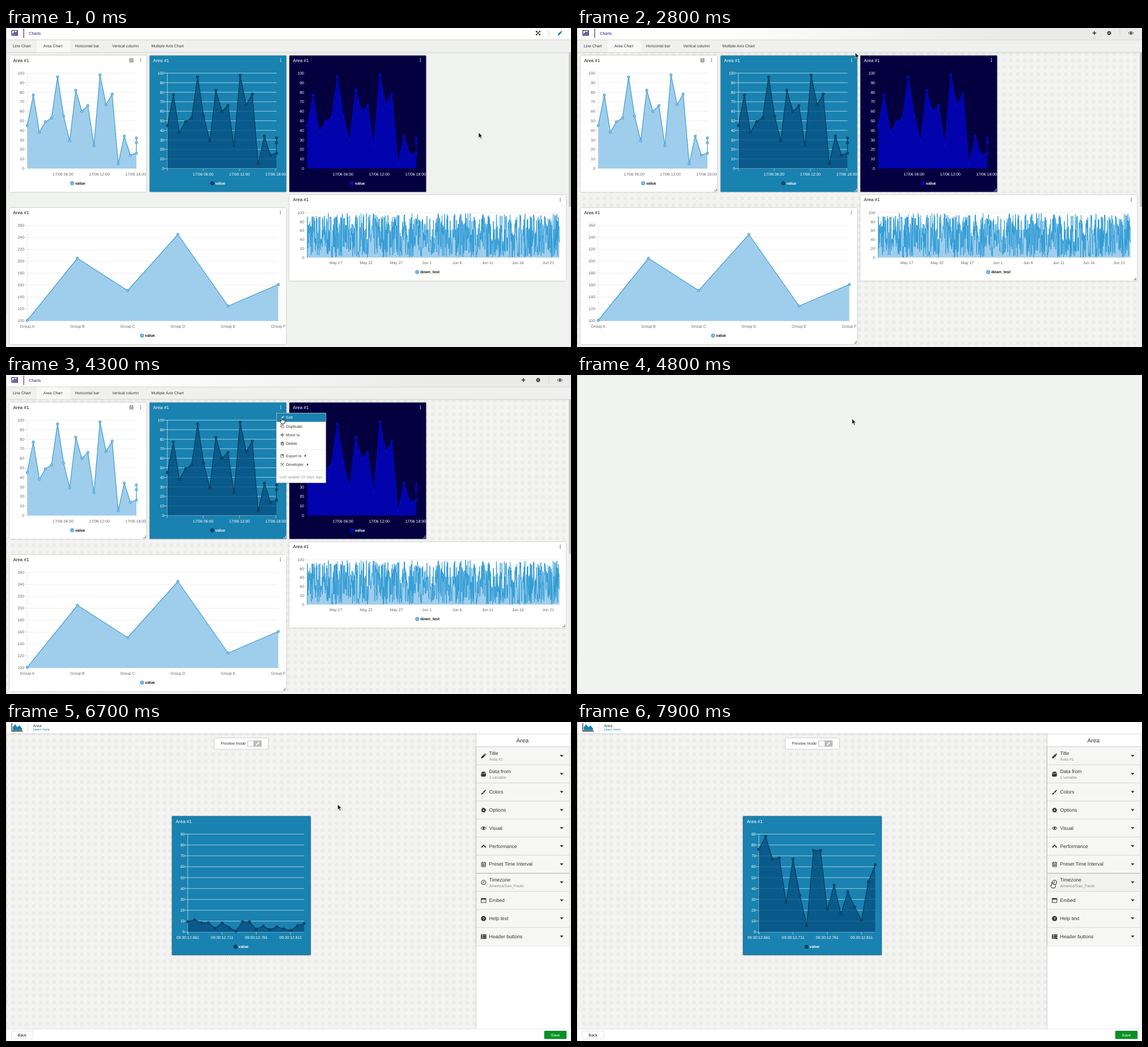
Recreate the animation shown at these times as an HTML page. Size 997 by 562 pixels, loop 8000 ms.

```html
<!DOCTYPE html>
<html lang="en">
<head>
<meta charset="utf-8">
<title>Charts dashboard</title>
<style>
html, body { margin: 0; width: 100%; height: 100%; overflow: hidden; background: #f0f2ef; }
svg { display: block; width: 100%; height: 100%; }
text { font: 6.9px "Liberation Sans", Arial, sans-serif; text-rendering: geometricPrecision; white-space: pre; }
.sh { filter: drop-shadow(0 .6px 1.2px rgba(0,0,0,.3)); }
</style>
</head>
<body>
<svg id="stage" viewBox="0 0 997 562" xmlns="http://www.w3.org/2000/svg"></svg>
<script>
const BLUE = '#1982b0', INK = '#333';

// ---- drawing helpers, all returning markup ----
const rect = (x, y, w, h, fill, extra = '') =>
  `<rect x="${x}" y="${y}" width="${w}" height="${h}" fill="${fill}" ${extra}/>`;
const line = (x1, y1, x2, y2, c, w = .7) =>
  `<path d="M${x1} ${y1}L${x2} ${y2}" stroke="${c}" stroke-width="${w}"/>`;
const dot = (x, y, r, fill, extra = '') => `<circle cx="${x}" cy="${y}" r="${r}" fill="${fill}" ${extra}/>`;
// y is the vertical middle of the capitals
const text = (s, x, y, { size = 6.9, fill = INK, anchor = 'start', bold = false } = {}) =>
  `<text x="${x}" y="${y + size * .355}" fill="${fill}" text-anchor="${anchor}" style="font-size:${size}px${bold ? ';font-weight:700' : ''}">${s}</text>`;
const group = (s, attr = '') => `<g ${attr}>${s}</g>`;
const dots3 = (x, y, c) => [-2.4, 0, 2.4].map(d => dot(x, y + d, .8, c)).join('');
const caret = (x, y, c = INK) => `<path d="M${x - 3.3} ${y - 1.6}h6.6l-3.3 3.5z" fill="${c}"/>`;

// icons live in a 10 x 10 box around the origin
const stroke = (d, w = 1) => `<path d="${d}" fill="none" stroke="currentColor" stroke-width="${w}"/>`;
const solid = d => `<path d="${d}" fill="currentColor" fill-rule="evenodd"/>`;
const icons = {
  pencil: solid('M-5 5L-4.3 2 1.4-3.7 3.8-1.3-2 4.4zM2-4.3L3-5.2 5.2-3 4.3-2z'),
  bars: stroke('M-5-4.2H5V4.2H-5z', 1.2) + solid('M-3.4 3V0h1.5v3zM-1.2 3V-2.7H.3V3zM1-1.4H2.4V3H1zM3-2.4H4.1V3H3z'),
  expand: stroke('M-3.6-3.6L3.6 3.6M3.6-3.6L-3.6 3.6', 1.3) + solid('M-4.6-4.6h3.4l-3.4 3.4zM4.6-4.6v3.4L1.2-4.6zM-4.6 4.6V1.2L-1.2 4.6zM4.6 4.6H1.2L4.6 1.2z'),
  plus: stroke('M-4 0H4M0-4V4', 2),
  gear: `<circle r="2.6" fill="none" stroke="currentColor" stroke-width="2.4"/><circle r="4" fill="none" stroke="currentColor" stroke-width="1.8" stroke-dasharray="1.57 1.57"/>`,
  eye: stroke('M-5.2 0Q0-6 5.2 0Q0 6-5.2 0z', 1.1) + '<circle r="2" fill="currentColor"/>',
  calendar: stroke('M-4.2-3.5H4.2V4.6H-4.2zM-4.2-1H4.2M-4.2 1.8H4.2M-1.4-1V4.6M1.4-1V4.6', .9) + stroke('M-2.3-5V-2.5M2.3-5V-2.5', 1.3),
  copy: stroke('M-2-2H4.5V4.5H-2zM-2 2H-4.5V-4.5H2V-2', 1),
  move: stroke('M-4 0H4M0-4V4', 1.2) + solid('M0-5.5L2-3H-2zM0 5.5L2 3H-2zM-5.5 0L-3 2V-2zM5.5 0L3 2V-2z'),
  trash: stroke('M-3.4-2.5H3.4V4.5H-3.4zM-5-2.8H5M-1.5-3V-4.6H1.5V-3M-1.2-1V3M1.2-1V3', 1.1),
  share: stroke('M0-3H-4.5V4.5H3.5V1', 1.1) + solid('M1-5L5.5-2 1 1V-1Q-1-1-2 1Q-2-3 1-3z'),
  tools: stroke('M-4.3-4.3L4.3 4.3M4.3-4.3L-4.3 4.3', 1.4) + stroke('M-5-2L-2-5M2-5L5-2', 1.2),
  data: solid('M-5-2.5L-1-5 4-4 2-1.2H-5zM-5-.5H2.5L4.6-3V3.5Q4 5 2.5 5H-3.5Q-5 5-5 3.5z'),
  brush: solid('M5-5Q2-4-1.2 0L.6 1.8Q4-1.6 5-5zM-1.8.8Q-4 1-4 3L-5.4 4.6Q-1 5.5-.2 2.4z'),
  up: stroke('M-4.3 2.4L0-2L4.3 2.4', 2.1),
  clock: '<circle r="4.3" fill="none" stroke="currentColor" stroke-width="1.2"/>' + stroke('M0-2.5V.5H-2', 1),
  frame: stroke('M-4.6-3.8H4.6V4H-4.6z', 1.1) + solid('M-5-4.3H5V-1.8H-5z'),
  help: '<circle r="5" fill="currentColor"/><text y="2.8" text-anchor="middle" fill="#fff" style="font-size:7.5px;font-weight:700">?</text>',
  list: solid('M-5.3-4.2h3v2.4h-3zM-5.3-1.2h3v2.4h-3zM-5.3 1.8h3v2.4h-3zM-1.5-4.2h7v2.4h-7zM-1.5-1.2h7v2.4h-7zM-1.5 1.8h7v2.4h-7z'),
};
const icon = (name, x, y, c = INK, k = .8) =>
  `<g transform="translate(${x} ${y}) scale(${k})" color="${c}">${icons[name]}</g>`;

// ---- charts ----
const light = { fill: '#9fcdec', line: '#45a1d1', dot: '#86bde4', grid: '#e6e6e6', label: '#666', text: '#111' };
const teal = { fill: '#065083', alpha: .8, line: '#083c5e', dot: '#0a4a74', grid: '#dcebf2', label: '#fff', text: '#fff' };
const navy = { fill: '#0204c0', alpha: .85, line: '#0307b8', dot: '#0409bd', grid: '#00001c', label: '#fff', text: '#fff' };

const series = (pts, base, st, r = 2.3) => {
  const d = pts.map(p => p.map(n => n.toFixed(2)).join(' ')).join('L');
  return `<path d="M${pts[0][0]} ${base}L${d}L${pts[pts.length - 1][0]} ${base}z" fill="${st.fill}" fill-opacity="${st.alpha || 1}"/>` +
    `<path d="M${d}" fill="none" stroke="${st.line}" stroke-width="${r ? 1.3 : 1}" stroke-linejoin="round"/>` +
    (r ? pts.map(p => dot(p[0], p[1], r, st.dot, `stroke="${st.line}" stroke-width=".8"`)).join('') : '');
};
// lo..hi every step; top and base are the y of hi and lo
const axes = (c, st) => {
  let s = line(c.x0, c.top, c.x0, c.base + 4, st.grid);
  for (let v = c.lo; v <= c.hi; v += c.step) {
    const y = c.base - (v - c.lo) / (c.hi - c.lo) * (c.base - c.top);
    s += line(c.x0 - 5.5, y, c.x1, y, st.grid) + text(v, c.x0 - 5.5, y, { fill: st.label, anchor: 'end' });
  }
  c.labels.forEach((l, i) => {
    const x = c.lx + i * c.dx;
    s += line(x, c.base, x, c.base + 4.5, st.grid) + text(l, x, c.base + 9.6, { fill: st.label, anchor: 'middle' });
  });
  return s;
};
const legend = (x, y, st, name = 'value') =>
  dot(x, y, 2.8, st.dot, `stroke="${st.line}" stroke-width="1.2"`) + text(name, x + 5.3, y, { fill: st.text, bold: true });

const card = (x, y, w, h, fill, ink, menuInk) =>
  rect(x, y, w, h, fill, 'rx="1" class="sh"') + text('Area #1', x + 6.2, y + 8.2, { size: 8, fill: ink }) +
  dots3(x + w - 10, y + 8.2, menuInk);

const daily = [45, 77, 38, 49, 53, 96, 55, 29, 82, 60, 66, 24, 98, 67, 78, 5, 34, 14, 16, 27, 32];
function dailyCard(x, fill, st) {
  const c = { lo: 0, hi: 100, step: 10, top: 79.5, base: 247.5, x0: x + 31.3, x1: x + 224, lx: x + 94.6, dx: 64,
    labels: ['17/06 06:00', '17/06 12:00', '17/06 18:00'] };
  const pts = daily.map((v, i) => [c.x0 + Math.min(i, 18) * 10.7, c.base - v * 1.68]);
  return card(x, 48.5, 241.3, 240.3, fill, st.text, st === light ? '#555' : '#fff') +
    axes(c, st) + series(pts, c.base, st) + legend(x + 110.5, 273.5, st);
}
function groupCard() {
  const c = { lo: 100, hi: 260, step: 20, top: 348, base: 516, x0: 37.5, x1: 480.5, lx: 37.5, dx: 88.6,
    labels: [...'ABCDEF'].map(l => 'Group ' + l) };
  const pts = [101, 205, 151, 245, 125, 161].map((v, i) => [37.5 + i * 88.6, 516 - (v - 100) * 1.05]);
  return card(6.2, 317, 488, 240, '#fff', '#111', '#555') + axes(c, light) + series(pts, 516, light) + legend(240, 542, light);
}
function noiseCard() {
  const c = { lo: 0, hi: 100, step: 20, top: 325.3, base: 404.3, x0: 531.5, x1: 977, lx: 582, dx: 53.55,
    labels: ['May 17', 'May 22', 'May 27', 'Jun 1', 'Jun 6', 'Jun 11', 'Jun 16', 'Jun 21'] };
  let seed = 7;
  const rnd = () => (seed = seed * 16807 % 2147483647) / 2147483647;
  const count = 1050;
  const pts = Array.from({ length: count }, (_, i) => [531.5 + i * 445 / (count - 1), 404.3 - rnd() * 78]);
  return card(500, 294.3, 488, 151, '#fff', '#111', '#555') + axes(c, light) +
    series(pts, 404.3, { ...light, line: '#2f9bd5' }, 0) + legend(725.6, 430, light, 'down_test');
}

// ---- dashboard ----
function dashboard() {
  const tabs = [['Line Chart', 12], ['Area Chart', 66], ['Horizontal bar', 121.7], ['Vertical column', 187.3], ['Multiple Axis Chart', 256.6]];
  const corner = (x, y, c) => `<path d="M${x - 4} ${y}h4v-4" fill="none" stroke="${c}" stroke-width="1.1"/>`;
  return rect(0, 0, 997, 562, '#f0f2ef') +
    group(rect(0, 43, 993, 519, '#f3f3f1') + rect(0, 43, 993, 519, 'url(#tiles)'), 'id="tilesOn"') +
    dailyCard(6.2, '#fff', light) + icon('calendar', 221.3, 56.8, '#666', .75) +
    dailyCard(253.4, BLUE, teal) + dailyCard(500, '#040040', navy) + groupCard() + noiseCard() +
    group(corner(246, 287, '#777') + corner(493.3, 287, '#dde') + corner(739.5, 287, '#aab') +
      corner(986, 443.5, '#777') + corner(492.5, 555.3, '#777'), 'id="corners"') +
    rect(0, 20, 997, 22.6, '#f0f1ef', 'class="sh"') + rect(54, 21, 59, 21.6, '#f8f9f7') +
    tabs.map(([s, x]) => text(s, x, 31.7)).join('') +
    rect(0, 0, 997, 20.3, '#fefefe', 'class="sh"') + group(rect(0, 0, 997, 20.3, 'url(#bar)'), 'id="barOn"') +
    icon('bars', 15.3, 8.7, '#20106f', 1) + line(31.3, 1, 31.3, 17.5, '#20106f', 1) +
    text('Charts', 40.3, 9.2, { size: 7.1, fill: '#21108a' }) + line(958, 2, 958, 16, '#ccc') +
    group(rect(966, 2.5, 23.5, 13.5, '#e3e6e4', 'rx="1"'), 'id="hover"') +
    group(icon('expand', 939, 8.9, '#222', .85) + icon('pencil', 977.5, 9, BLUE, .8), 'id="viewTools"') +
    group(icon('plus', 913, 8.7, INK, .8) + icon('gear', 939, 8.9, INK, .78) + icon('eye', 977.5, 8.9, INK, .85), 'id="editTools"') +
    rect(993, 43, 4, 519, '#ededec') + rect(993.3, 43, 3.7, 272, '#c3c4c3') +
    group(rect(947, 20, 43, 18.7, BLUE, 'rx="1" class="sh"') + text('Edit mode', 968.3, 29.5, { fill: '#fff', anchor: 'middle' }), 'id="tip"') +
    group(menu(), 'id="menu"');
}
function menu() {
  const rows = [['Edit', 'pencil', 75], ['Duplicate', 'copy', 90.2], ['Move to', 'move', 105.6], ['Delete', 'trash', 120.7],
    ['Export to', 'share', 142.2], ['Developer', 'tools', 157.8]];
  const arrow = (x, y) => `<path d="M${x} ${y - 2.3}l2.6 2.3-2.6 2.3z" fill="${INK}"/>`;
  const row = ([s, i, y], c) => icon(i, 487.5, y, c, .62) + text(s, 494, y, { fill: c });
  return rect(477, 67, 87.5, 123, '#fff', 'class="sh" stroke="#aaa" stroke-width=".6"') +
    rows.map(r => row(r, INK)).join('') + arrow(527, 142.2) + arrow(531, 157.8) +
    line(477, 131.3, 564.5, 131.3, '#ddd') + line(477, 168.3, 564.5, 168.3, '#ddd') +
    text('Last update 15 days ago', 482.6, 179.2, { fill: '#999' }) +
    group(rect(477.5, 67.5, 86.5, 15, BLUE) + row(rows[0], '#fff'), 'id="editRow"');
}

// ---- widget editor ----
function editor() {
  const rows = [['Title', 'pencil', 'Area #1'], ['Data from', 'data', '1 variable'], ['Colors', 'brush'], ['Options', 'gear'],
    ['Visual', 'eye'], ['Performance', 'up'], ['Preset Time Interval', 'calendar'], ['Timezone', 'clock', 'America/Sao_Paulo'],
    ['Embed', 'frame'], ['Help text', 'help'], ['Header buttons', 'list']];
  const side = rows.map(([s, i, sub], n) => {
    const y = 43.7 + n * 31.83, m = y + 15.8;
    return rect(830, y, 164, 31.83, '#f6f6f4', n === 7 ? 'id="zone"' : '') + line(830, y, 994, y, n === 7 ? '#aaa' : '#cfcfcf', n === 7 ? 1.2 : .8) +
      icon(i, 842.7, m + .3, INK, .9) + text(s, 852.6, sub ? m - 4.6 : m - .2, { size: 8.6 }) +
      (sub ? text(sub, 852.6, m + 5.8, { fill: '#888' }) : '') + caret(980.5, m);
  }).join('');
  return rect(0, 0, 997, 562, '#f3f3f1') + rect(0, 20, 830, 522, 'url(#tiles)') +
    rect(368.3, 28.5, 94, 19, '#fff', 'class="sh"') + text('Preview mode', 379.2, 38) +
    rect(426, 32.5, 25.2, 11, '#bdbdbd', 'rx="1"') + rect(427, 33.5, 9.8, 9, '#fff', 'rx="1"') + icon('pencil', 444, 38, '#fff', .65) +
    rect(829.5, 20, 164.5, 522, '#fff') + line(829.5, 20, 829.5, 541, '#ccc', .9) + rect(994, 20, 3, 522, '#f4f4f3') +
    text('Area', 911.3, 32, { size: 10.2, anchor: 'middle' }) +
    rect(830, 43.7, 164, 350, '#f6f6f4', 'class="sh"') + side +
    rect(0, 0, 997, 20.3, '#fefefe', 'class="sh"') +
    `<path d="M10.3 2V16H29.5" fill="none" stroke="#333" stroke-width="1.3"/><path d="M12 14.8V9L16 4 20 9 24 6 28.3 11.5V14.8z" fill="${BLUE}"/>` +
    line(38.7, 1.5, 38.7, 16.5, '#ccc') + text('Area', 47.6, 6.3, { size: 7 }) + text('Learn more', 47.6, 13.2, { size: 5.8, fill: BLUE }) +
    rect(0, 541, 997, 21, '#fff') + line(0, 541, 997, 541, '#ddd') +
    rect(9.5, 544.5, 38, 13.7, '#fff', 'rx="1" stroke="#ddd" stroke-width=".8"') + text('Back', 28.5, 551.2, { fill: '#111', anchor: 'middle' }) +
    rect(949.7, 544, 39.5, 14.5, '#0a8f24', 'rx="1.5"') + text('Save', 969.4, 551.2, { fill: '#fff', anchor: 'middle' }) +
    group(rect(293, 166, 244.5, 244.5, BLUE, 'rx="1" class="sh"') +
      rect(293, 166, 244.5, 244.5, 'none', 'rx="1" stroke="#0d4f6d" stroke-width=".9" stroke-dasharray="2 1.4"') +
      text('Area #1', 299.5, 175, { size: 8, fill: '#fff' }) +
      axes({ lo: 0, hi: 90, step: 10, top: 197.5, base: 370, x0: 320.8, x1: 526.2, lx: 320.8, dx: 60.4,
        labels: ['661', '711', '761', '811'].map(n => '09:30:12.' + n) }, teal) +
      group('', 'id="live"') + legend(405, 396, teal));
}
const liveData = [76, 88, 67, 68, 27, 67, 34, 6, 75, 75, 21, 43, 17, 37, 23, 11, 46, 62];
const livePoints = k => liveData.map((v, i) => [320.8 + i * 12.08, 370 - v * k * 172.5 / 90]);

// ---- pointer ----
const arrow = '<path d="M0 0V9.6L2.2 7.6 3.8 11.2 5.4 10.5 3.9 7H6.9z" fill="#181818" stroke="#fff" stroke-width=".6"/>';
const hand = '<path d="M-.9.9Q0-.6.9.9V4L5.2 5Q6 5.4 5.8 7L5 10.8H-.6L-3.2 6.6Q-2.6 5.2-.9 6.6z" fill="#fff" stroke="#111" stroke-width=".9" stroke-linejoin="round"/>';

document.getElementById('stage').innerHTML =
  `<defs><pattern id="tiles" width="12.15" height="12.15" x="7" y="3" patternUnits="userSpaceOnUse">${rect(2, 2, 6.6, 6.6, '#ebebe9', 'rx="1.5"')}</pattern>
  <linearGradient id="bar"><stop offset=".25" stop-color="#fefefe"/><stop offset=".75" stop-color="#eaeae9"/></linearGradient></defs>` +
  group(dashboard(), 'id="dash"') +
  group(rect(0, 0, 997, 562, '#f0f3f0') + line(0, .4, 997, .4, '#e6e8e6') + group(dot(499.5, 280, 8, 'none', 'stroke="#d3d8d6" stroke-width="1.2" id="ring"') + dot(499.5, 280, 3, '#b4bbb9', 'id="core"')), 'id="blank"') +
  group(editor(), 'id="edit"') +
  rect(0, 0, 1, 504, '#bfc1bf') + rect(0, 504, 1, 58, '#dcdedc') +
  group(arrow, 'id="arrow"') + group(hand, 'id="hand"');

// ---- timeline ----
const LOOP = 8000;
// time, x, y of the tip
const path = [[0, 834, 184], [400, 834, 184], [500, 858, 166], [600, 858, 166], [800, 906, 100], [1000, 970, 24], [1100, 970, 24],
  [1200, 979, 10], [1400, 981.5, 8.5], [2000, 981.5, 8.5], [2400, 942, 29], [2500, 942, 29], [2800, 491, 43.5], [2900, 491, 43.5],
  [3000, 485.5, 51], [3100, 485.5, 51], [3200, 485.5, 54], [3500, 485.5, 55], [4000, 486, 73.5], [4200, 486.5, 75], [4700, 486.5, 75],
  [4800, 485.3, 77], [6300, 485.3, 77], [6700, 585.3, 145], [7100, 585.3, 145], [7200, 592, 155], [7500, 700, 215], [7900, 838.5, 281.5]];
const hands = [[1200, 2100], [3200, 4800], [7800, 8000]];

const el = id => document.getElementById(id);
const show = (id, o) => { el(id).style.display = o > 0 ? '' : 'none'; el(id).style.opacity = o; };
const ramp = (t, a, b) => Math.max(0, Math.min(1, (t - a) / (b - a)));
const within = (t, a, b) => +(t >= a && t < b);

function pointer(t) {
  let i = 0;
  while (i < path.length - 2 && path[i + 1][0] <= t) i++;
  const [a, ax, ay] = path[i], [b, bx, by] = path[i + 1], k = ramp(t, a, b);
  const at = `translate(${ax + (bx - ax) * k} ${ay + (by - ay) * k})`;
  const over = hands.some(([s, e]) => within(t, s, e));
  el('hand').setAttribute('transform', at);
  el('arrow').setAttribute('transform', at);
  show('hand', +over);
  show('arrow', +!over);
}

function draw(t) {
  show('dash', within(t, 0, 4800));
  show('blank', within(t, 4800, 6400));
  show('edit', within(t, 6400, LOOP));

  const editing = ramp(t, 1600, 2000);
  show('tilesOn', editing);
  show('corners', editing);
  show('barOn', editing);
  show('viewTools', within(t, 0, 1700));
  show('editTools', within(t, 1700, 4800));
  show('hover', within(t, 1200, 2100));
  show('tip', within(t, 1200, 1900) * ramp(t, 1100, 1400) * (1 - ramp(t, 1600, 1900)));
  show('menu', within(t, 3300, 4800) * ramp(t, 3200, 3500));
  show('editRow', within(t, 3900, 4800));

  show('ring', within(t, 5400, 5700));
  show('core', within(t, 5400, 6400));
  el('core').setAttribute('r', 2.6 + .8 * Math.sin(Math.max(t - 5800, 0) / 200 * Math.PI / 2));

  const k = 1 - (1 - ramp(t, 6667, 7667)) ** 4;
  el('live').innerHTML = k ? series(livePoints(k), 370, teal) : '';
  el('zone').setAttribute('fill', t >= 7800 ? '#f1f1ef' : '#f6f6f4');
  pointer(t);
}

const start = performance.now();
let last = -1;
function tick() {
  const t = Math.floor((performance.now() - start) % LOOP / 100) * 100;
  if (t !== last) draw(last = t);
  requestAnimationFrame(tick);
}
tick();
</script>
</body>
</html>
```
